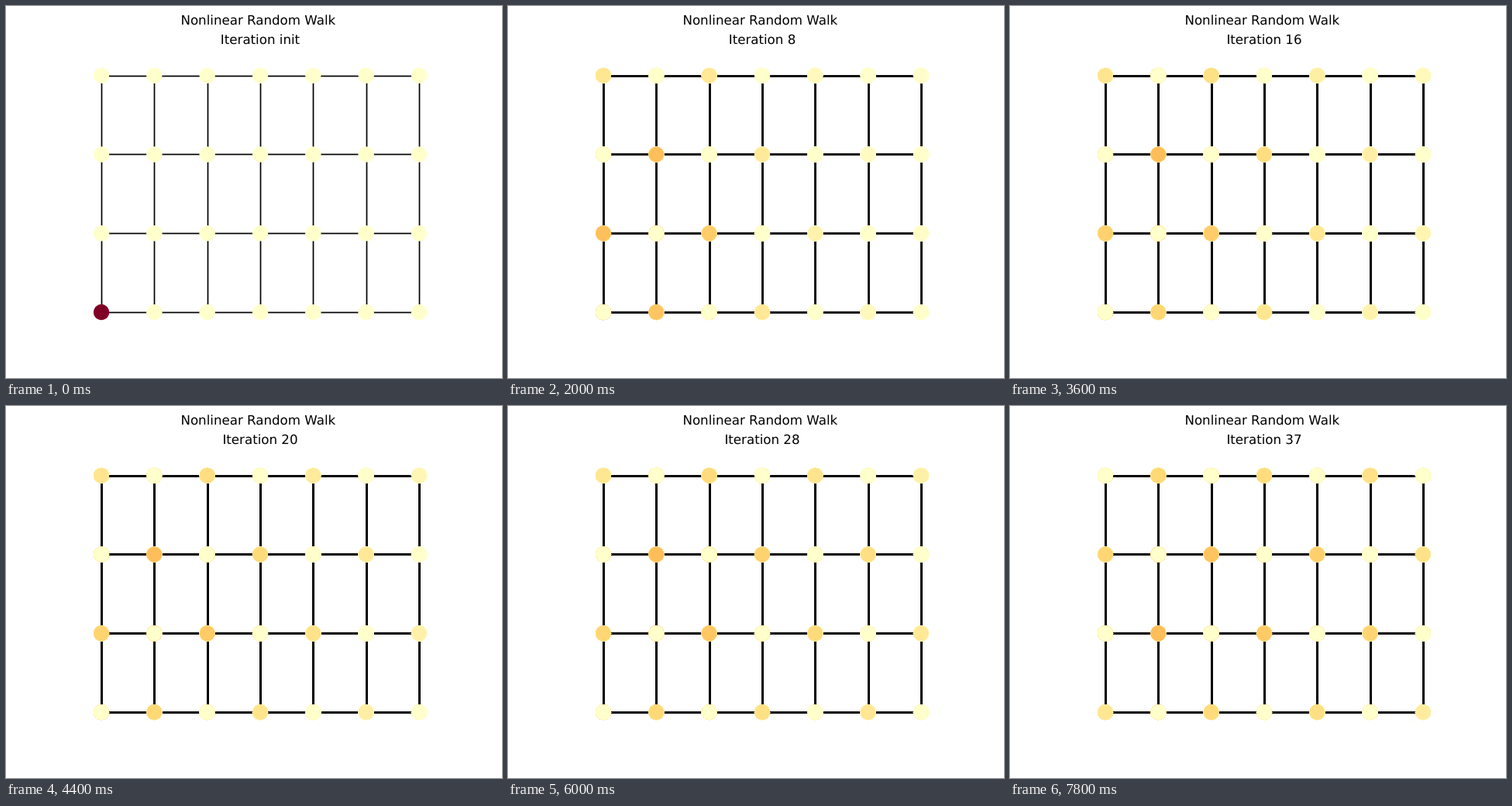
These frames come from a looping animation (640x480 px, 8 s). An HTML page with a canvas:

```html
<!DOCTYPE html>
<html lang="en">
<head>
<meta charset="utf-8">
<title>Random walk on a grid</title>
<style>
  html, body { margin: 0; width: 100%; height: 100%; overflow: hidden; background: #fff; }
  canvas, svg { position: absolute; left: 0; top: 0; width: 640px; height: 480px; }
  text { font: 16.667px "DejaVu Sans", sans-serif; text-anchor: middle; text-rendering: geometricPrecision; }
</style>
</head>
<body>
<canvas id="stage" width="640" height="480"></canvas>
<svg viewBox="0 0 640 480">
  <text x="325.35" y="24">Nonlinear Random Walk</text>
  <text id="label" x="328" y="49">Iteration init</text>
</svg>
<script>
const COLS = 7, ROWS = 4, STEP_MS = 200, STEPS = 40;
const RADIUS = 10.02, LINE_BLEED = 0.1944;
const PALETTE = [[255, 255, 204], [255, 237, 160], [254, 217, 118], [254, 178, 76],
  [253, 141, 60], [252, 78, 42], [227, 26, 28], [189, 0, 38], [128, 0, 38]];

const ctx = document.getElementById('stage').getContext('2d');
const label = document.getElementById('label');

const nodeX = col => 123.04 + col * 68.32;
const nodeY = row => 395.13 - row * 101.82;

// Nodes are numbered row by row from the bottom left.
const nodes = Array.from({ length: COLS * ROWS }, (_, i) => ({ col: i % COLS, row: Math.floor(i / COLS) }));
const neighbours = nodes.map(a => nodes.flatMap((b, j) =>
  Math.abs(a.col - b.col) + Math.abs(a.row - b.row) === 1 ? [j] : []));

function walk(state) {
  const next = state.map(() => 0);
  state.forEach((p, i) => neighbours[i].forEach(j => { next[j] += p / neighbours[i].length; }));
  return next;
}

function colour(value) {
  const pos = value * (PALETTE.length - 1);
  const i = Math.min(Math.floor(pos), PALETTE.length - 2);
  return `rgb(${PALETTE[i].map((c, k) => Math.round(c + (PALETTE[i + 1][k] - c) * (pos - i)))})`;
}

// The start is full scale; later states peak at a third of it.
const shades = [];
for (let state = nodes.map((_, i) => i ? 0 : 1), n = 0; n < STEPS; n++, state = walk(state)) {
  const scale = n ? 3 * Math.max(...state) : 1;
  shades.push(state.map(p => colour(p / scale)));
}

function drawLines(alpha) {
  const left = nodeX(0), top = nodeY(ROWS - 1);
  const width = nodeX(COLS - 1) - left, height = nodeY(0) - top;
  const grid = (alpha, grow) => {
    ctx.fillStyle = `rgba(0,0,0,${alpha})`;
    for (let c = 0; c < COLS; c++) ctx.fillRect(Math.round(nodeX(c)) - grow, top, 1 + 2 * grow, height);
    for (let r = 0; r < ROWS; r++) ctx.fillRect(left, Math.round(nodeY(r)) - grow, width, 1 + 2 * grow);
  };
  grid(alpha, 1);
  grid(1, 0);
}

function drawNodes(shade) {
  nodes.forEach(({ col, row }, i) => {
    ctx.fillStyle = shade[i];
    ctx.beginPath();
    ctx.arc(nodeX(col), nodeY(row), RADIUS, 0, 2 * Math.PI);
    ctx.fill();
  });
}

// Each step paints over all earlier ones, so soft edges build up.
function draw(step) {
  ctx.fillStyle = '#fff';
  ctx.fillRect(0, 0, 640, 480);
  drawLines(1 - (1 - LINE_BLEED) ** (step + 2));
  for (let k = -1; k <= step; k++) drawNodes(shades[Math.max(0, k - 1)]);
  label.textContent = 'Iteration ' + (step < 2 ? 'init' : step - 2);
}

let shown = -1;
function tick() {
  const step = Math.floor(performance.now() / STEP_MS) % STEPS;
  if (step !== shown) draw(shown = step);
  requestAnimationFrame(tick);
}
tick();
</script>
</body>
</html>
```
